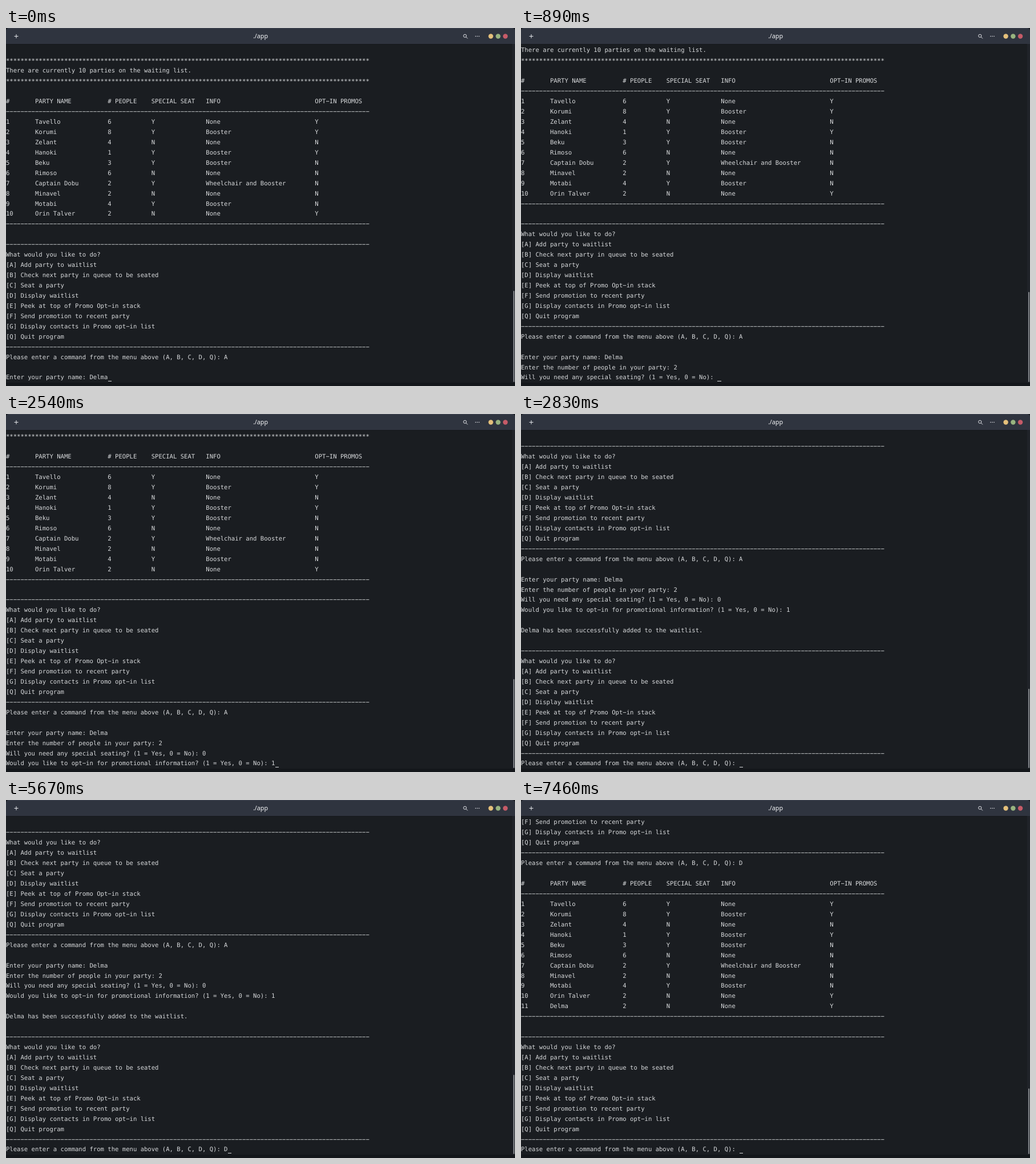
Animation of 892 by 628 pixels, one loop 8000 ms. Source, as an HTML page:

```html
<!DOCTYPE html>
<html lang="en">
<head>
<meta charset="utf-8">
<title>./app</title>
<style>
  html, body { margin: 0; width: 100%; height: 100%; overflow: hidden; background: #1a1d21; }
  #stage { position: relative; width: 892px; height: 628px; overflow: hidden; background: #1a1d21; }
  #stage > * { position: absolute; }
  #bar { left: 0; top: 0; }
  #title {
    left: 0; top: 0; width: 892px; height: 28px; text-align: center;
    font: 500 10.8px/28px "Noto Sans", sans-serif; color: #f4f5f7;
  }
  #screen {
    left: 0; top: 31.45px; margin: 0; color: #d8dadc;
    font: 10.59px/17.94px "DejaVu Sans Mono", monospace;
    text-rendering: geometricPrecision; font-variant-ligatures: none;
  }
  #screen div { height: 17.94px; white-space: pre; }
  #screen .stars { position: relative; top: 1px; }
  #cursor { top: 619px; width: 6.4px; height: 1px; background: #d8dadc; }
  #edge { left: 0; top: 622px; width: 892px; height: 6px; background: #14171b; }
  #track { left: 887px; top: 28px; width: 5px; height: 594px; background: #202329; }
  #thumb { left: 888.5px; width: 2.5px; border-radius: 1.5px; background: #84878b; }
</style>
</head>
<body>
<div id="stage">
  <svg id="bar" width="892" height="29" fill="none" stroke="#e6e8ec">
    <rect width="892" height="29" fill="#14171b" stroke="none"/>
    <path d="M0 28V5Q0 0 5 0H887Q892 0 892 5V28Z" fill="#2f343f" stroke="none"/>
    <path d="M4 .5H888" stroke="#3b414d"/>
    <path d="M14.5 14.5h7M18 11v7"/>
    <circle cx="804.3" cy="13.8" r="2.6"/>
    <path d="M806.2 15.7l2.8 2.8"/>
    <g fill="#e6e8ec" stroke="none">
      <circle cx="823" cy="14.5" r=".8"/><circle cx="826" cy="14.5" r=".8"/><circle cx="829" cy="14.5" r=".8"/>
    </g>
    <g stroke="none">
      <circle cx="849.6" cy="14.5" r="4.2" fill="#e5c07b"/>
      <circle cx="862.4" cy="14.5" r="4.2" fill="#98b47f"/>
      <circle cx="875.1" cy="14.5" r="4.2" fill="#c65b68"/>
    </g>
  </svg>
  <div id="title">./app</div>
  <div id="edge"></div>
  <div id="screen"></div>
  <div id="track"></div>
  <div id="thumb"></div>
  <div id="cursor"></div>
</div>
<script>
const LOOP = 8000, ROWS = 33, CELL = 6.375;
const $ = id => document.getElementById(id);

const rule = "-".repeat(100), stars = "*".repeat(100);
const columns = [0, 8, 28, 40, 55, 85];
const tableRow = cells => cells.reduce((line, cell, i) => line.padEnd(columns[i]) + cell, "");

const guest = "Delma";
const parties = [
  ["Tavello", 6, "Y", "None", "Y"],
  ["Korumi", 8, "Y", "Booster", "Y"],
  ["Zelant", 4, "N", "None", "N"],
  ["Hanoki", 1, "Y", "Booster", "Y"],
  ["Beku", 3, "Y", "Booster", "N"],
  ["Rimoso", 6, "N", "None", "N"],
  ["Captain Dobu", 2, "Y", "Wheelchair and Booster", "N"],
  ["Minavel", 2, "N", "None", "N"],
  ["Motabi", 4, "Y", "Booster", "N"],
  ["Orin Talver", 2, "N", "None", "Y"]
];
const table = list => [
  tableRow(["#", "PARTY NAME", "# PEOPLE", "SPECIAL SEAT", "INFO", "OPT-IN PROMOS"]),
  rule,
  ...list.map((party, i) => tableRow([i + 1, ...party])),
  rule, ""
];
const menu = [
  rule,
  "What would you like to do?",
  "[A] Add party to waitlist",
  "[B] Check next party in queue to be seated",
  "[C] Seat a party",
  "[D] Display waitlist",
  "[E] Peek at top of Promo Opt-in stack",
  "[F] Send promotion to recent party",
  "[G] Display contacts in Promo opt-in list",
  "[Q] Quit program",
  rule
];
const ask = {
  command: "Please enter a command from the menu above (A, B, C, D, Q): ",
  name: "Enter your party name: ",
  people: "Enter the number of people in your party: ",
  seating: "Will you need any special seating? (1 = Yes, 0 = No): ",
  promos: "Would you like to opt-in for promotional information? (1 = Yes, 0 = No): "
};

// Each history extends the one before it; the prompt is the last row.
const atName = ["", stars, "There are currently 10 parties on the waiting list.", stars, "",
  ...table(parties), ...menu, ask.command + "A", ""];
const atPeople = [...atName, ask.name + guest];
const atSeating = [...atPeople, ask.people + "2"];
const atPromos = [...atSeating, ask.seating + "0"];
const atMenu = [...atPromos, ask.promos + "1", "",
  guest + " has been successfully added to the waitlist.", "", ...menu];
const atList = [...atMenu, ask.command + "D", "",
  ...table([...parties, [guest, 2, "N", "None", "Y"]]), ...menu];

// [start ms, history, prompt row, thumb top, cursor shown]
const steps = [
  [0, atName, ask.name + guest, 461, true],
  [150, atPeople, ask.people, 462, true],
  [750, atPeople, ask.people + "2", 462, true],
  [890, atSeating, ask.seating, 463, true],
  [1490, atSeating, ask.seating, 463, false],
  [1790, atSeating, ask.seating + "0", 463, true],
  [2090, atPromos, ask.promos, 464.5, true],
  [2540, atPromos, ask.promos + "1", 464.5, true],
  [2830, atMenu, ask.command, 482, true],
  [3430, atMenu, ask.command, 482, false],
  [4030, atMenu, ask.command, 482, true],
  [4620, atMenu, ask.command, 482, false],
  [5220, atMenu, ask.command, 482, true],
  [5670, atMenu, ask.command + "D", 482, true],
  [6260, atList, ask.command, 506, true],
  [6860, atList, ask.command, 506, false],
  [7460, atList, ask.command, 506, true]
];

const rows = Array.from({ length: ROWS }, () => $("screen").appendChild(document.createElement("div")));

function show([, history, prompt, thumbTop, cursorOn]) {
  const lines = [...history, prompt].slice(-ROWS);
  rows.forEach((row, i) => {
    row.textContent = lines[i].replace(/-/g, "\u2212");
    row.className = lines[i] === stars ? "stars" : "";
  });
  $("cursor").style.left = prompt.length * CELL + "px";
  $("cursor").style.visibility = cursorOn ? "visible" : "hidden";
  $("thumb").style.top = thumbTop + "px";
  $("thumb").style.height = 621 - thumbTop + "px";
}

let current;
const begin = performance.now();
function tick() {
  const time = (performance.now() - begin) % LOOP;
  const step = steps.findLast(([start]) => start <= time);
  if (step !== current) show(current = step);
  requestAnimationFrame(tick);
}
tick();
</script>
</body>
</html>
```
